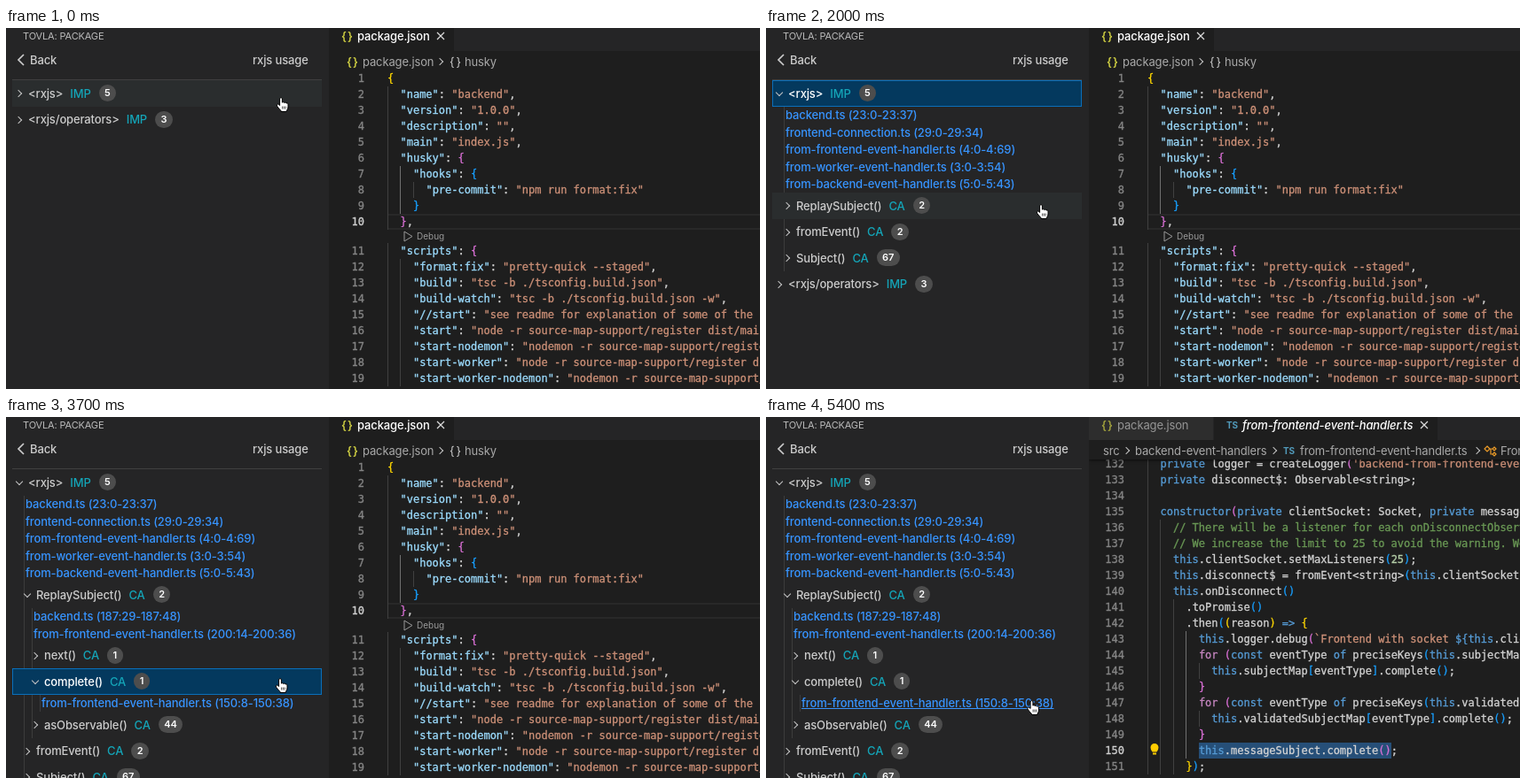
These frames come from a looping animation (850 px wide and 408 px high, 5.7 s). An HTML page:

```html
<!DOCTYPE html>
<html lang="en">
<head>
<meta charset="utf-8">
<title>Package usage tree</title>
<style>
  html, body { margin: 0; width: 100%; height: 100%; overflow: hidden; background: #1e1e1e; }
  body { position: relative; font: 13px/18px Inter, sans-serif; letter-spacing: -.14px; color: #ccc; white-space: pre; }
  .at, .box, svg { position: absolute; }
  svg { overflow: visible; fill: none; }

  #side { left: 0; top: 0; width: 364px; height: 408px; background: #252526; overflow: hidden; font-weight: 500; }
  #tree { left: 7px; top: 59.2px; width: 349px; }
  .row { position: relative; display: flex; align-items: center; height: 29.5px;
         padding-left: calc(18px + 9px * var(--level)); }
  .row.hover { background: #2a2d2e; }
  .row.selected { background: #04395e; color: #fff; outline: 1px solid #0a6fba; outline-offset: -1px; }
  .tag { margin: 0 9px 0 8px; color: #14a5b8; }
  .badge { padding: 0 6.5px; border-radius: 9.5px; background: #4d4d4d; color: #fff; font-size: 11px; line-height: 19px; font-weight: 600; }
  .kids { position: relative; }
  .kids::before { content: ""; position: absolute; top: 0; bottom: 0; width: 1px;
                  left: calc(4px + 9px * var(--level)); background: #3c3c3c; }
  .link { position: relative; top: .7px; width: max-content; height: 19.5px; line-height: 19.5px; color: #3794ff;
          margin-left: calc(6px + 9px * var(--level)); }
  .link.hover { text-decoration: underline; }
  .chevron { position: absolute; width: 5px; height: 5px; border: solid #c5c5c5; border-width: 0 1px 1px 0;
             transform: rotate(-45deg); }
  .row .chevron { left: calc(4px + 9px * var(--level)); top: 12px; }
  .row .open { transform: rotate(45deg); left: calc(5px + 9px * var(--level)); top: 10.5px; }

  .editor { left: 364px; top: 0; width: 486px; height: 408px; overflow: hidden; }
  .code { left: 0; top: 0; width: 100%; font: 12px/18px "DejaVu Sans Mono", monospace; letter-spacing: 0;
          -webkit-text-stroke-width: .3px; }
  .line { position: relative; height: 18px; color: #858585; }
  .line b { position: absolute; width: 40px; text-align: right; font-weight: normal; }
  .line.current b { color: #d0d0d0; }
  .text { position: absolute; left: 66px; width: 420px; height: 18px; }
  .text span { position: relative; }
  .text i { position: absolute; top: 0; width: 1px; height: 18px; background: #404040; }
  .text i.active { background: #707070; }
  .text i.selection { left: 8ch; width: 30ch; background: #264f78; }
  .text i.caret { left: 38ch; width: 2px; background: #aeafad; }
  #json .current .text { box-shadow: inset 0 2px #282828, inset 0 -2px #282828; }
  .lens { position: relative; height: 15px; -webkit-text-stroke-width: 0; }
  .head { left: 0; top: 0; width: 100%; height: 48px; background: linear-gradient(#252526 26px, #1e1e1e 0); }
  #ts .head { box-shadow: 0 0 4px #000; }
  .tab { top: 0; height: 26px; background: #1e1e1e; }
  #pointer { left: 0; top: 0; pointer-events: none; }
</style>
</head>
<body><div id="side" class="box"></div><div id="json" class="box editor"></div><div id="ts" class="box editor"></div><svg id="pointer" width="20" height="20"></svg>
<script type="text/plain" id="jsonText">
{
  "name": "backend",
  "version": "1.0.0",
  "description": "",
  "main": "index.js",
  "husky": {
    "hooks": {
      "pre-commit": "npm run format:fix"
    }
  },
  "scripts": {
    "format:fix": "pretty-quick --staged",
    "build": "tsc -b ./tsconfig.build.json",
    "build-watch": "tsc -b ./tsconfig.build.json -w",
    "//start": "see readme for explanation of some of the
    "start": "node -r source-map-support/register dist/main.js",
    "start-nodemon": "nodemon -r source-map-support/register",
    "start-worker": "node -r source-map-support/register dist",
    "start-worker-nodemon": "nodemon -r source-map-support/reg",
</script>
<script type="text/plain" id="tsText">
  private logger = createLogger('backend-from-frontend-event-handler');
  private disconnect$: Observable<string>;
  
  constructor(private clientSocket: Socket, private messageSubject: Subject) {
    // There will be a listener for each onDisconnectObservable
    // We increase the limit to 25 to avoid the warning. We
    this.clientSocket.setMaxListeners(25);
    this.disconnect$ = fromEvent<string>(this.clientSocket);
    this.onDisconnect()
      .toPromise()
      .then((reason) => {
        this.logger.debug(`Frontend with socket ${this.clientSocket.id}`);
        for (const eventType of preciseKeys(this.subjectMap)) {
          this.subjectMap[eventType].complete();
        }
        for (const eventType of preciseKeys(this.validatedSubjectMap)) {
          this.validatedSubjectMap[eventType].complete();
        }
        this.messageSubject.complete();
      });
</script>
<script>
const LOOP = 5700, STEP = 100;
const UNSELECT = 4700, OPEN_FILE = 4900, CARET_OFF = 5400;
const $ = id => document.getElementById(id);
const esc = s => s.replace(/&/g, '&amp;').replace(/</g, '&lt;');

// Small drawing helpers
const label = (x, y, html, color = '#ccc', css = '') =>
  `<span class="at" style="left:${x}px;top:${y - 9}px;color:${color};${css}">${html}</span>`;
const chevron = (x, y) => `<i class="chevron" style="left:${x - 4}px;top:${y - 3}px"></i>`;
const tab = (x, width, color) => `<div class="box tab" style="left:${x}px;width:${width}px;background:${color}"></div>`;
const shape = (x, y, d, paint) => `<svg style="left:${x}px;top:${y}px" width="1" height="1"><path d="${d}" ${paint}/></svg>`;
const close = x => shape(x, 9, 'M-4-4 4 4M4-4-4 4', 'stroke="#ddd" stroke-width="1.2"');
const braces = (x, y, color) => label(x, y, '{}', color, 'font-weight:600;letter-spacing:1px');
const tsMark = (x, y) => label(x, y, 'TS', '#519aba', 'font-size:10px;font-weight:700');

// Syntax colours
const BRACKETS = ['#ffd700', '#da70d6', '#179fff'];
const RULES = [
  ['"[^"]*"(?=:)', '#9cdcfe'],
  ['"[^"]*"?', '#ce9178'],
  ['//.*', '#6a9955'],
  ["'[^']*'|}`|`[^`$]*", '#ce9178'],
  ['\\$\\{|=>|\\b(?:private|constructor|this|const|of)\\b', '#569cd6'],
  ['\\bfor\\b', '#c586c0'],
  ['\\d+', '#b5cea8'],
  ['[{(\\[]', 'open'],
  ['[})\\]]', 'close'],
  ['[\\w$]+|[^]', '#d4d4d4']
];
const TOKEN = new RegExp(RULES.map(([pattern]) => `(${pattern})`).join('|'), 'g');

function codeLines(id, { first, depth, current, guide }) {
  const lines = $(id).textContent.replace(/^\n|\n$/g, '').split('\n');
  return lines.map((line, index) => {
    const number = first + index;
    const levels = line.search(/\S|$/) / 2;
    let guides = '';
    for (let k = 0; k < levels; k++) {
      const active = k === guide.level && number >= guide.from && number <= guide.to;
      guides += `<i class="${active ? 'active' : ''}" style="left:${2 * k}ch"></i>`;
    }
    const colored = line.replace(TOKEN, (token, ...groups) => {
      let color = RULES[groups.findIndex(g => g !== undefined)][1];
      if (color === 'open') color = BRACKETS[depth++ % 3];
      if (color === 'close') color = BRACKETS[--depth % 3];
      return `<span style="color:${color}">${esc(token)}</span>`;
    });
    const isCurrent = number === current;
    const marks = isCurrent && id === 'tsText' ? '<i class="selection"></i><i class="caret"></i>' : '';
    return `<div class="line${isCurrent ? ' current' : ''}"><b>${number}</b>` +
      `<div class="text">${guides}${marks}${colored}</div></div>`;
  });
}

function buildJson() {
  const lines = codeLines('jsonText', { first: 1, depth: 0, current: 10, guide: { level: 1, from: 7, to: 9 } });
  const lens = '<div class="lens">' + shape(85, 2, 'M0 0 9 5.5 0 11Z', 'stroke="#999"') +
    label(99, 7, 'Debug', '#999', 'font:10px/18px Inter,sans-serif') + '</div>';
  lines.splice(10, 0, lens);
  $('json').innerHTML = `<div class="box code" style="top:48px">${lines.join('')}</div><div class="box head">` +
    tab(0, 141, '#1e1e1e') + braces(14, 9, '#cbcb41') + label(32, 9, 'package.json', '#fff', 'font-weight:500') + close(126) +
    braces(20, 38, '#cbcb41') + label(38, 38, 'package.json', '#a9a9a9') + chevron(126, 38) +
    label(136, 38, '{}', '#ccc', 'letter-spacing:2px') + label(153, 38, 'husky', '#a9a9a9') + '</div>';
}

function buildTs() {
  const lines = codeLines('tsText', { first: 132, depth: 1, current: 150, guide: { level: 3, from: 143, to: 150 } });
  const file = 'from-frontend-event-handler.ts', grey = '#a9a9a9';
  $('ts').innerHTML = `<div class="box code" style="top:44px">${lines.join('')}</div>` +
    shape(74, 375, 'M-2.5 3.5Q-4.5 1-4.5-1.5A4.5 4.5 0 0 1 4.5-1.5Q4.5 1 2.5 3.5ZM-2 4.5H2V6.5H-2Z', 'fill="#fc0"') +
    '<div class="box head">' +
    tab(0, 140, '#2d2d2d') + braces(14, 9, '#a0a03c') + label(32, 9, 'package.json', '#969696') +
    tab(141, 252, '#1e1e1e') + tsMark(155, 9) + label(173, 9, file, '#fff', 'font-style:italic;font-weight:500') + close(378) +
    label(16, 38, 'src', grey) + chevron(43, 38) + label(52, 38, 'backend-event-handlers', grey) + chevron(209, 38) +
    tsMark(219, 38) + label(238, 38, file, grey) + chevron(438, 38) +
    shape(446, 32, 'M3 1 6 4 3 7 0 4ZM6 4H9M7 4V10H9M11 2 13 4 11 6 9 4ZM11 8 13 10 11 12 9 10Z', 'stroke="#ee9d28" stroke-width="1.2"') +
    label(464, 38, 'FromFrontendEventHandler', grey) + '</div>';
}

// Usage tree; click is the time at which a node is opened
const node = (name, tag, count, click = Infinity, links = [], kids = []) => ({ name, tag, count, click, links, kids });
const TREE = [
  node('<rxjs>', 'IMP', 5, 300, [
    'backend.ts (23:0-23:37)',
    'frontend-connection.ts (29:0-29:34)',
    'from-frontend-event-handler.ts (4:0-4:69)',
    'from-worker-event-handler.ts (3:0-3:54)',
    'from-backend-event-handler.ts (5:0-5:43)'
  ], [
    node('ReplaySubject()', 'CA', 2, 2100, [
      'backend.ts (187:29-187:48)',
      'from-frontend-event-handler.ts (200:14-200:36)'
    ], [
      node('next()', 'CA', 1),
      node('complete()', 'CA', 1, 3600, ['from-frontend-event-handler.ts (150:8-150:38)']),
      node('asObservable()', 'CA', 44)
    ]),
    node('fromEvent()', 'CA', 2),
    node('Subject()', 'CA', 67)
  ]),
  node('<rxjs/operators>', 'IMP', 3)
];
const CLICKS = [300, 2100, 3600];

function treeHtml(nodes, level, t) {
  const selected = t < UNSELECT ? CLICKS.filter(c => c <= t).pop() : undefined;
  return nodes.map(n => {
    const open = n.click <= t;
    const row = `<div class="row${n.click === selected ? ' selected' : ''}"><i class="chevron${open ? ' open' : ''}"></i>` +
      `${esc(n.name)}<span class="tag">${n.tag}</span><span class="badge">${n.count}</span></div>`;
    if (!open) return row;
    const links = n.links.map(link => `<div class="link">${link}</div>`).join('');
    return `${row}<div class="kids" style="--level:${level + 1}">${links}${treeHtml(n.kids, level + 1, t)}</div>`;
  }).join('');
}

// Pointer path: time, x, y of the tip
const PATH = [[0, 310, 78], [200, 309, 73], [900, 309, 73], [1500, 311, 175], [2000, 310, 199], [2700, 310, 199],
  [3500, 309, 295], [4100, 309, 295], [4400, 299.5, 320], [LOOP, 299.5, 320]];
const ARROW = '<path d="M0 0V14.5L3.4 11.4 5.6 16.4 7.9 15.4 5.8 10.5H10.3Z" fill="#000" stroke="#fff"/>';
const HAND = '<path d="M-1.4 9.5V2A1.4 1.4 0 0 1 1.4 2V6.2A1.3 1.3 0 0 1 3.7 6.6 1.3 1.3 0 0 1 6 7.2 1.2 1.2 0 0 1 8 8V11' +
  'Q8 13.5 6.5 15.2V16.5H0V15.5Q-2.4 13.2-4.6 10-5 8.4-3.8 8-2.6 8-1.4 9.5Z" fill="#fff" stroke="#000"/>' +
  '<path d="M1.6 10.5V13.5M3.4 10.5V13.5M5.2 10.5V13.5" stroke="#000" stroke-width=".7"/>';

function pointerAt(t) {
  const next = PATH.findIndex(key => key[0] > t);
  const [t0, x0, y0] = PATH[next - 1], [t1, x1, y1] = PATH[next];
  const p = (t - t0) / (t1 - t0);
  return [x0 + (x1 - x0) * p, y0 + (y1 - y0) * p];
}

let shown = -1;
function draw() {
  const t = Math.floor(performance.now() % LOOP / STEP) * STEP;
  if (t !== shown) {
    shown = t;
    $('tree').innerHTML = treeHtml(TREE, 0, t);
    const [x, y] = pointerAt(t);
    const under = document.elementFromPoint(x, y);
    const target = under && under.closest('.row, .link');
    if (target && !target.matches('.selected')) target.classList.add('hover');
    $('pointer').innerHTML = target ? HAND : ARROW;
    $('pointer').style.transform = `translate(${x}px, ${y}px)`;
    $('json').hidden = t >= OPEN_FILE;
    $('ts').hidden = t < OPEN_FILE;
    document.querySelector('.caret').hidden = t >= CARET_OFF;
  }
  requestAnimationFrame(draw);
}

$('side').innerHTML = label(19, 9, 'TOVLA: PACKAGE', '#bbb', 'font-size:11px;font-weight:400') +
  shape(14, 36, 'M6-6 0 0 6 6', 'stroke="#ccc" stroke-width="1.7"') + label(27, 36, 'Back') + label(278, 36, 'rxjs usage') +
  '<div class="box" style="left:7px;top:58px;width:349px;height:1px;background:#404040"></div>' +
  '<div id="tree" class="box" style="--level:0"></div>';
buildJson();
buildTs();
draw();
</script>
</body>
</html>
```
